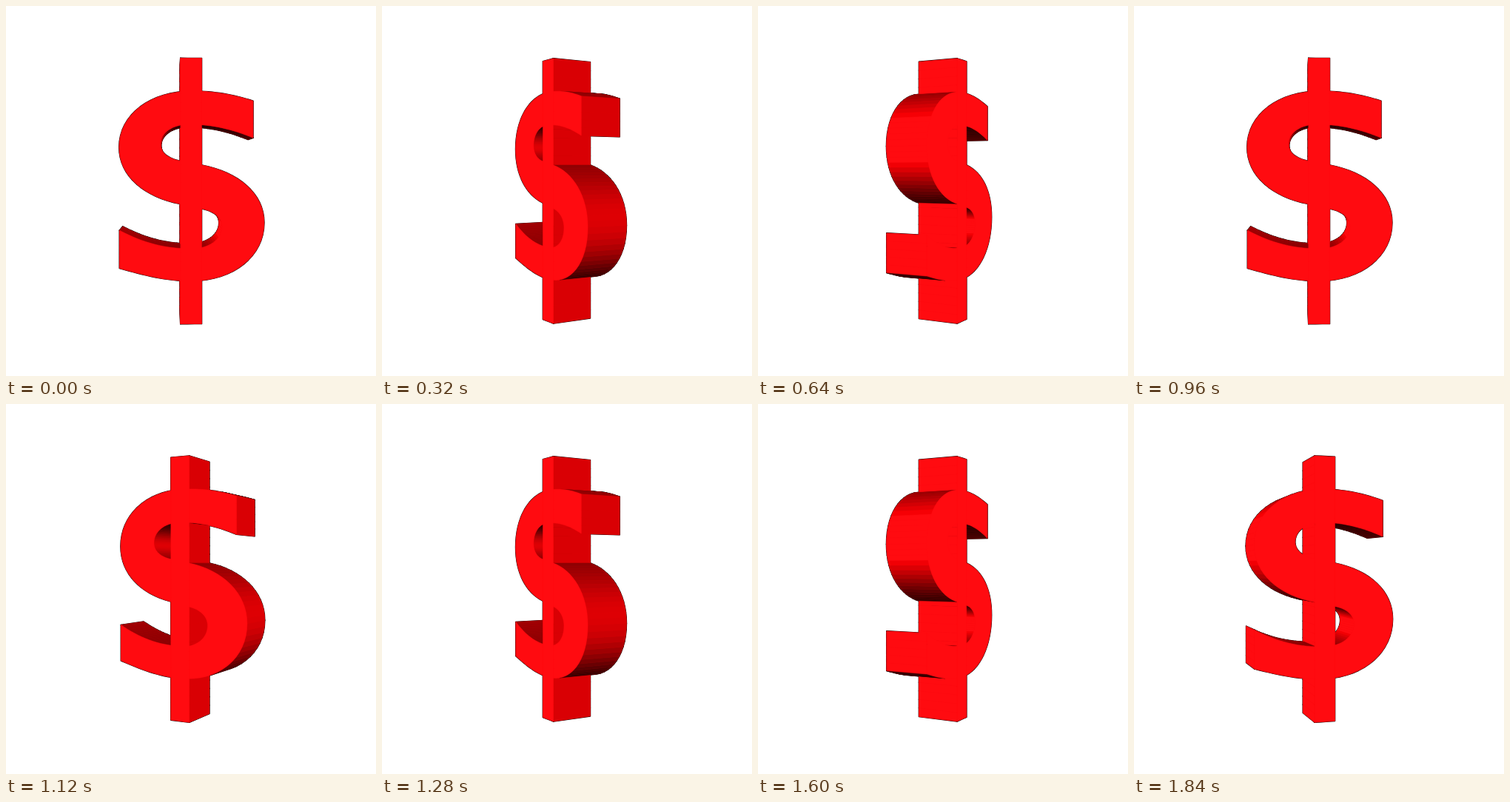
These frames come from a looping animation (500x500 px, 1920 ms). An HTML page with a canvas:

```html
<!DOCTYPE html>
<html lang="en">
<head>
<meta charset="utf-8">
<title>Spinning dollar sign</title>
<style>
  html, body { margin: 0; width: 100%; height: 100%; overflow: hidden; background: #fff; }
  canvas { display: block; width: 500px; height: 500px; }
</style>
</head>
<body>
<canvas id="stage" width="500" height="500"></canvas>
<script>
const ctx = document.getElementById('stage').getContext('2d');
const EYE = 900, TILT = 0.035, HALF_DEPTH = 29, CENTRE = 250;
const STEP_MS = 80, STEPS = 12, START_DEG = -1.6;
const FRONT = '#ff0b10';
const rad = deg => deg * Math.PI / 180;

// Key points of the S seen face-on: x, y, heading in degrees.
const UPPER_EDGE = [
  [333.5, 128, 197], [252, 115, 180], [152.5, 191, 90], [235, 267.5, 11],
  [264, 274, 11], [291.5, 298, 90], [250, 328, 180], [153, 303, 208]
];
const LOWER_EDGE = [
  [153, 354, 16], [250, 371.5, 0], [348.5, 293, -90], [264, 215, -169],
  [235, 209.5, -169], [208, 187, -90], [247, 160, 0], [333.5, 178, 22]
];

// Rounds the way between two headed points like an elliptic arc.
function arc([ax, ay, aDeg], [bx, by, bDeg]) {
  const turn = Math.abs(rad(bDeg - aDeg));
  const ratio = turn ? 1.05 * 4 / 3 * Math.tan(turn / 4) / Math.sin(turn) : 1 / 3;
  const handle = deg => {
    const ux = Math.cos(rad(deg)), uy = Math.sin(rad(deg));
    const reach = ratio * Math.abs((bx - ax) * ux + (by - ay) * uy);
    return [ux * reach, uy * reach];
  };
  const [hx, hy] = handle(aDeg), [kx, ky] = handle(bDeg);
  const bezier = (t, p0, p1, p2, p3) => {
    const u = 1 - t;
    return u * u * u * p0 + 3 * u * u * t * p1 + 3 * u * t * t * p2 + t * t * t * p3;
  };
  return Array.from({ length: 16 }, (_, i) => [
    bezier(i / 16, ax, ax + hx, bx - kx, bx),
    bezier(i / 16, ay, ay + hy, by - ky, by)
  ]);
}

function edge(keys) {
  const last = keys[keys.length - 1];
  return [...keys.slice(1).flatMap((key, i) => arc(keys[i], key)), last.slice(0, 2)];
}

// Cuts long sides short, so that walls sort well by distance.
function divide(points) {
  return points.flatMap(([x, y], i) => {
    const [ex, ey] = points[(i + 1) % points.length];
    const n = Math.ceil(Math.hypot(ex - x, ey - y) / 12);
    return Array.from({ length: n }, (_, j) => [x + (ex - x) * j / n, y + (ey - y) * j / n]);
  });
}

// Face-on stage positions to units at the depth of the axis.
function toModel(points) {
  const shrink = (EYE - HALF_DEPTH) / EYE;
  return points.map(([x, y]) => [(x - CENTRE) * shrink, (y - CENTRE) * shrink]);
}

function rect(left, top, right, bottom) {
  return [[right, top], [left, top], [left, bottom], [right, bottom]];
}

// Lights are fixed to the sign: strong from its left, weaker from its right and above.
function shade(nx, ny) {
  const light = 0.34 - 0.2 * ny + (nx > 0 ? 0.51 : 0.8) * nx * nx;
  return light >= 1 ? FRONT : `rgb(${Math.round(255 * light)},0,${Math.round(5 * light)})`;
}

function makeWalls(points) {
  return points.map((p, i) => {
    const q = points[(i + 1) % points.length];
    const len = Math.hypot(q[0] - p[0], q[1] - p[1]);
    const nx = (p[1] - q[1]) / len, ny = (q[0] - p[0]) / len;
    return { p, q, nx, ny, mx: (p[0] + q[0]) / 2, my: (p[1] + q[1]) / 2, color: shade(nx, ny) };
  });
}

const outlines = [[...edge(UPPER_EDGE), ...edge(LOWER_EDGE)], rect(235.2, 70.5, 263.8, 429.5)]
  .map(points => toModel(divide(points)));
const walls = outlines.flatMap(makeWalls);

function draw(angle) {
  const sin = Math.sin(angle), cos = Math.cos(angle);
  const eyeX = EYE * sin, eyeY = -EYE * TILT;

  const project = ([x, y], z) => {
    const near = x * sin + z * cos;
    const k = EYE / (EYE - near);
    return [CENTRE - 0.2 + (x * cos - z * sin) * k, CENTRE + y * k + TILT * (near - HALF_DEPTH)];
  };
  const shape = points => {
    const path = new Path2D();
    points.forEach(([x, y]) => path.lineTo(x, y));
    path.closePath();
    return path;
  };

  const faces = walls
    .filter(w => w.nx * (eyeX - w.mx) + w.ny * (eyeY - w.my) > 0)
    .map(w => ({ w, dist: Math.hypot(eyeX - w.mx, eyeY - w.my) }))
    .sort((a, b) => b.dist - a.dist)
    .map(({ w }) => ({
      color: w.color,
      path: shape([project(w.p, HALF_DEPTH), project(w.q, HALF_DEPTH),
                   project(w.q, -HALF_DEPTH), project(w.p, -HALF_DEPTH)])
    }));
  for (const points of outlines) {
    faces.push({ color: FRONT, path: shape(points.map(p => project(p, HALF_DEPTH))) });
  }

  const paint = (width, colorOf) => {
    ctx.lineWidth = width;
    for (const face of faces) {
      ctx.fillStyle = ctx.strokeStyle = colorOf(face);
      ctx.fill(face.path);
      ctx.stroke(face.path);
    }
  };

  ctx.fillStyle = '#fff';
  ctx.fillRect(0, 0, 500, 500);
  ctx.lineJoin = 'round';
  // A dark rim, a red base that hides the seams, then the lit faces.
  paint(1.7, () => '#000');
  paint(0.4, () => FRONT);
  paint(0.5, face => face.color);
}

const start = performance.now();
let shown = -1;

function tick() {
  const step = Math.floor((performance.now() - start) / STEP_MS) % STEPS;
  if (step !== shown) {
    shown = step;
    // Past edge-on, the front swings in again from the other side.
    const turn = step * 180 / STEPS - (step > STEPS / 2 ? 180 : 0);
    draw(rad(turn + START_DEG));
  }
  requestAnimationFrame(tick);
}
tick();
</script>
</body>
</html>
```
